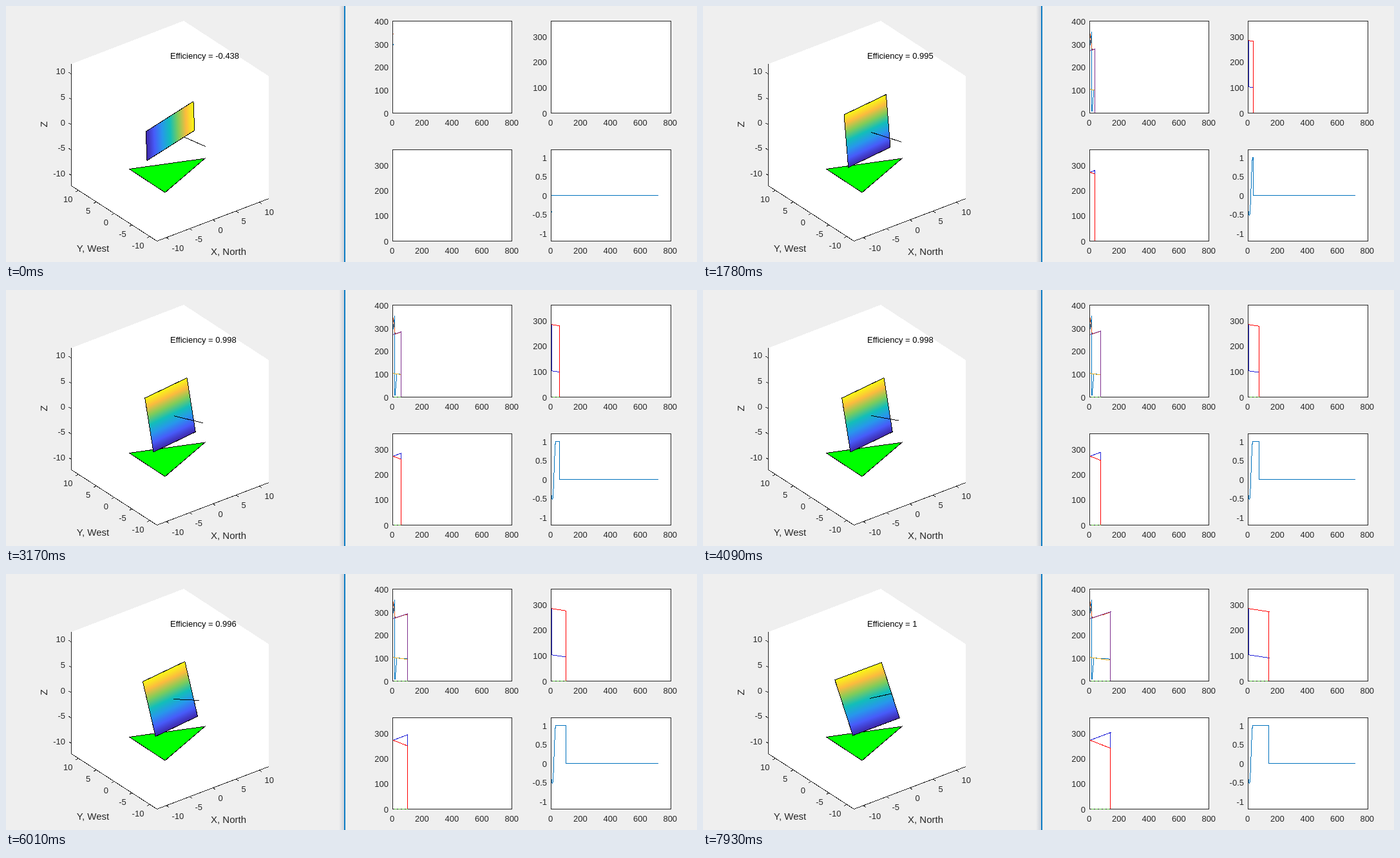
Recreate the animation shown at these times as an HTML page. Size 1073 by 398 pixels, loop 8 s.

```html
<!DOCTYPE html>
<html lang="en">
<head>
<meta charset="utf-8">
<title>Solar panel tracking</title>
<style>
html, body { margin: 0; width: 100%; height: 100%; overflow: hidden; background: #efefef; }
svg { display: block; width: 1073px; height: 398px; shape-rendering: crispEdges; }
text { font: 13px "Liberation Sans", Arial, sans-serif; fill: #262626; }
text.name { font-size: 15px; }
.mid { text-anchor: middle; }
.end { text-anchor: end; }
.ink { fill: none; stroke: #000; }
.axis { fill: none; stroke: #262626; }
.plot { fill: none; stroke-linejoin: bevel; }
</style>
</head>
<body>
<svg id="stage" viewBox="0 0 1073 398">
  <defs>
    <linearGradient id="parula" x1="0" y1="1" x2="0" y2="0">
      <stop offset="0" stop-color="#3e26a8"/>
      <stop offset=".167" stop-color="#475bf9"/>
      <stop offset=".333" stop-color="#2797eb"/>
      <stop offset=".5" stop-color="#12beb9"/>
      <stop offset=".667" stop-color="#81cc59"/>
      <stop offset=".833" stop-color="#fcbb3e"/>
      <stop offset="1" stop-color="#f9fb15"/>
    </linearGradient>
    <linearGradient id="shadeL">
      <stop offset="0" stop-color="#8a98b0" stop-opacity="0"/>
      <stop offset="1" stop-color="#8a98b0" stop-opacity=".35"/>
    </linearGradient>
    <linearGradient id="shadeR">
      <stop offset="0" stop-color="#707070" stop-opacity=".45"/>
      <stop offset="1" stop-color="#707070" stop-opacity="0"/>
    </linearGradient>
  </defs>
  <path fill="#fff" d="M102 90L276 23L408 109V299L235 366L102 279Z"/>
  <path id="box3d" class="axis"/>
  <text class="name mid" x="135" y="382">Y, West</text>
  <text class="name mid" x="345.5" y="387">X, North</text>
  <text class="name mid" transform="translate(64 184) rotate(-90)">Z</text>
  <path fill="#0f0" stroke="#000" d="M191.5 253.5L309 237L247 290Z"/>
  <path id="rayBack" class="ink"/>
  <rect id="face" width="1" height="1" fill="url(#parula)"/>
  <path id="rim" class="ink"/>
  <path id="rayFront" class="ink"/>
  <text id="eff" x="255" y="82" style="fill:#000"></text>
  <g id="rightOn">
    <rect x="517" width="8" height="398" fill="url(#shadeL)"/>
    <rect x="525" width="2" height="398" fill="#0c7cc4"/>
  </g>
  <g id="leftOn">
    <rect x="527" width="8" height="398" fill="url(#shadeR)"/>
    <rect x="525" width="2" height="398" fill="#2a6690"/>
    <rect x="525" width="2" height="31" fill="#1a8ae0"/>
  </g>
</svg>
<script>
const LOOP = 8000, TICK = 76.8, FIRST = 166;
const stage = document.getElementById('stage');
const el = id => document.getElementById(id);

function add(tag, attrs, content) {
  const node = document.createElementNS('http://www.w3.org/2000/svg', tag);
  for (const key in attrs) node.setAttribute(key, attrs[key]);
  if (content !== undefined) node.textContent = content;
  return stage.appendChild(node);
}
const label = (x, y, cls, str) => add('text', { x, y: Math.round(y + 4.6), class: cls }, str);

// Axes of the 3D view, each running from -12 to 12
let axes = 'M101.5 90V279.5L234.5 365.5L408 299.5';
for (let v = -10; v <= 10; v += 5) {
  const f = (v + 12) / 24;
  const yx = 234.5 - 133 * f, xx = 234.5 + 173 * f;
  axes += `M101.5 ${279 - 189 * f}l-4 -2.5M${yx} ${365.5 - 86 * f}l-4 2M${xx} ${365.5 - 66 * f}l4 2.5`;
  label(92, 181 - v * 7.95, 'end', v);
  label(yx - 9, 336 - v * 3.6, 'end', v);
  label(xx + 8.5, 348 - v * 2.8, '', v);
}
el('box3d').setAttribute('d', axes);

// Angles in degrees and efficiency, by sample number
const sunAzimuth = n => 271 + .22 * n;
const mirrorAzimuth = n => 272 - .23 * n;
const zenith = n => 103 - .088 * n;
const roll = n => n < 4 ? 284 : zenith(n);
const pitch = n => 284 - .09 * n;
const panelAzimuth = n => n < 16 ? 357 - 5 * n : sunAzimuth(n - n % 12);
function panelTurn(n) {
  if (n <= 14) return 284 + 5 * n;
  return n < 28 ? 7.1 * (n - 14) : 100 - .035 * (n - 28);
}
function efficiency(n) {
  if (n < 9) return -.53 + .00256 * (9 - n) ** 2;
  if (n < 31) return .235 - .764 * Math.cos(Math.PI * (n - 9) / 22);
  return .9975 + .0022 * Math.cos(2 * Math.PI * (n - 142) / 30);
}

const BLUE = '#0072bd';
const compare = [['#2222d8', roll], ['#f00', pitch]];
const charts = [
  { x: 600, top: 23.5, bottom: 166.5, lo: 0, hi: 400, last: 400, step: 100,
    series: [[BLUE, panelTurn], ['#d95319', panelAzimuth], ['#edb120', zenith], ['#7e2f8e', sunAzimuth]] },
  { x: 846, top: 23.5, bottom: 166.5, lo: 0, hi: 360, last: 300, step: 100, series: compare },
  { x: 600, top: 223.5, bottom: 365.5, lo: 0, hi: 360, last: 300, step: 100,
    series: [['#2222d8', sunAzimuth], ['#f00', mirrorAzimuth]] },
  { x: 846, top: 223.5, bottom: 365.5, lo: -1.2, hi: 1.2, last: 1, step: .5, series: [[BLUE, efficiency]] }
];

for (const c of charts) {
  const width = c.x > 800 ? 186 : 185, height = c.bottom - c.top;
  c.px = n => c.x + n * .2322;
  c.py = v => c.bottom - (v - c.lo) / (c.hi - c.lo) * height;
  add('rect', { x: c.x, y: c.top, width, height, fill: '#fff' });
  c.lines = c.series.map(([stroke]) => add('path', { class: 'plot', stroke }));
  add('rect', { class: 'axis', x: c.x + .5, y: c.top, width, height });
  c.dash = add('path', { class: 'plot', stroke: '#58c63c', 'stroke-dasharray': '4 2' });
  for (let v = c.last; v >= c.lo; v -= c.step) label(c.x - 6, c.py(v) + .8, 'end', v);
  for (let n = 0; n <= 800; n += 200) label(c.px(n) - .5, c.bottom + 15, 'mid', n);
}

// Each series is filled up to the current sample and zero after it
function drawCharts(count) {
  for (const c of charts) {
    const edge = Math.floor(c.px(count)) + .5;
    c.series.forEach(([, fn], i) => {
      let path = 'M';
      for (let n = 0; n <= count; n++) path += `${c.px(n) + .5} ${c.py(fn(n))}L`;
      path += `${edge} ${c.py(fn(count))}V${c.py(0)}H${c.px(720)}`;
      c.lines[i].setAttribute('d', path);
    });
    c.dash.setAttribute('d', c.lo === 0 && count > 40 ? `M${c.x + 3} ${c.bottom}H${edge}` : '');
  }
}

const pace = [[-1, 3], [12, 28], [28, 45], [51, 75], [63, 79], [87, 122], [101, 142]];
const nudges = [38, 62, 83, 100];

function sampleAt(k) {
  const i = Math.max(1, pace.findIndex(p => p[0] >= k));
  const [k0, n0] = pace[i - 1], [k1, n1] = pace[i];
  return Math.round(n0 + (n1 - n0) * (k - k0) / (k1 - k0));
}

const CX = 255, CY = 194.3;
const project = (x, y, z) => [7.2 * x - 5.54 * y, -2.75 * x - 3.58 * y - 7.9 * z];

// The panel swings round to the sun, then follows it in small nudges
function drawPanel(k, n) {
  const step = nudges.filter(at => k >= at).length;
  const turn = Math.min(242.45 + 8.85 * k, 366.5 - 7 * (step / 4) ** 6);
  const tilt = 6 + 48.3 * Math.exp(-(k + 1) / 1.9) + 6.15 * step;
  const a = turn * Math.PI / 180, b = tilt * Math.PI / 180;
  const s = Math.sin(a), c = Math.cos(a), lean = 10 * Math.sin(b);
  const [ax, ay] = project(10 * c, 10 * s, 0);
  const [bx, by] = project(lean * s, -lean * c, -10 * Math.cos(b));
  const x = CX - (ax + bx) / 2, y = CY - (ay + by) / 2;
  el('face').setAttribute('transform', `matrix(${ax} ${ay} ${bx} ${by} ${x} ${y})`);
  el('rim').setAttribute('d', `M${x} ${y}l${ax} ${ay}l${bx} ${by}l${-ax} ${-ay}Z`);

  const dx = 55 - .03 * n - .00064 * n * n, dy = 24.7 - .19 * n - .0003 * n * n;
  const ray = `M${CX + dx / 8.5} ${CY + dy / 8.5}L${CX + dx} ${CY + dy}`;
  const behind = efficiency(n) < 0;
  el('rayBack').setAttribute('d', behind ? ray : '');
  el('rayFront').setAttribute('d', behind ? '' : ray);
}

function draw(time) {
  const k = Math.max(-1, Math.floor((time % LOOP - FIRST) / TICK));
  const n = sampleAt(k);
  drawCharts(n);
  drawPanel(k, n);
  el('eff').textContent = 'Efficiency = ' + parseFloat(efficiency(n).toPrecision(3));
  const left = k % 13 === 9;
  el('leftOn').style.display = left ? '' : 'none';
  el('rightOn').style.display = left ? 'none' : '';
}

const start = performance.now();
function frame() {
  draw(performance.now() - start);
  requestAnimationFrame(frame);
}
frame();
</script>
</body>
</html>
```
